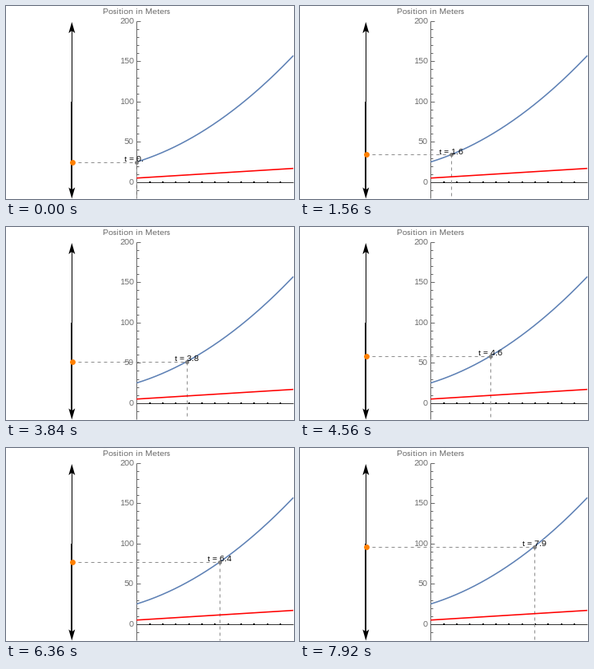
Recreate the animation shown at these times as a matplotlib script. Size 360x242 px, loop 8 s.

```python
import numpy as np
import matplotlib.pyplot as plt
from matplotlib.animation import FuncAnimation

W, H, DPI = 360, 242, 64
PT = 72 / DPI            # points per pixel
TICK_MS, STEP_MS, LOOP_MS = 40, 120, 8000
X0, Y0 = 163.3, 220.8    # pixel place of the plot's origin
SX, SY = 16.32, 1.01     # pixels per second and per meter
RAIL = 82
GRAY = "#666666"

# whole-pixel glyph widths, as in small screen text
plt.rcParams.update({
    "font.family": "Liberation Sans",
    "text.hinting": "native",
    "text.hinting_factor": 1,
    "toolbar": "None",
})


def px(t):
    return X0 + SX * t


def py(v):
    return Y0 - SY * v


def position(t):
    return 25 + 5 * t + 0.5 * t**2


fig = plt.figure(figsize=(W / DPI, H / DPI), dpi=DPI, facecolor="white")
ax = fig.add_axes([0, 0, 1, 1])
ax.set_xlim(0, W)
ax.set_ylim(H, 0)
ax.axis("off")


def line(xs, ys, color, width=1.0, z=2, **kw):
    return ax.plot(xs, ys, color=color, lw=width * PT, zorder=z,
                   solid_capstyle="butt", dash_capstyle="butt", **kw)[0]


def text(x, y, s, color, ha="left", z=2):
    return ax.text(x, y, s, color=color, ha=ha, va="baseline",
                   fontsize=10 * PT, zorder=z)


def dot(color, size, z):
    return ax.plot([], [], "o", color=color, ms=size * PT, mew=0, zorder=z)[0]


def arrow_head(tip, d):
    x = RAIL + 0.3
    ax.fill([x, x + 4, x, x - 4],
            [tip, tip + 14 * d, tip + 11 * d, tip + 14 * d],
            color="black", lw=0, zorder=3)


# axes
line([X0, X0], [py(200), 241], GRAY)
for v in range(-10, 201, 10):
    major = v % 50 == 0
    line([X0, X0 + (4.5 if major else 2.5)], [py(v)] * 2, GRAY)
    if major:
        text(160, py(v) + 3, str(v), GRAY, "right")
line([X0, 359], [Y0, Y0], "#333333")
for t in range(1, 12):
    line([px(t)] * 2, [Y0 - 1, Y0 + 1], "black", 2)
text(163, 10, "Position in Meters", GRAY, "center")

# curves
ts = np.linspace(0, 12, 200)
line(px(ts), py(position(ts)), "#5e81b5", 1.6, 4)
line(px(ts), py(5 + ts), "#ff0000", 1.6, 4)

# vertical rail
line([RAIL, RAIL], [30, 121], "black", 1)
line([RAIL, RAIL], [120, 231], "black", 2)
arrow_head(20, 1)
arrow_head(241.5, -1)

# moving parts
dashes = dict(dashes=(4, 4))
across = line([], [], "#8c8c8c", 1, 3, **dashes)
down = line([], [], "#8c8c8c", 1, 3, **dashes)
marker = dot("#808080", 5, 5)
bead = dot("#ff8000", 7, 6)
label = text(0, 0, "", "black", z=7)


def update(i):
    t = i * TICK_MS // STEP_MS * STEP_MS / 1000
    x, y = px(t), py(position(t))
    across.set_data([RAIL, x], [y, y])
    down.set_data([x, x], [y, 241])
    marker.set_data([x], [y])
    bead.set_data([RAIL + 0.5], [y])
    label.set_position((x - 14.8, y - 0.6))
    label.set_text("t = " + f"{t:.1f}".replace(".0", "."))
    return across, down, marker, bead, label


anim = FuncAnimation(fig, update, frames=LOOP_MS // TICK_MS,
                     interval=TICK_MS, repeat=True, repeat_delay=0)
plt.show()
```
